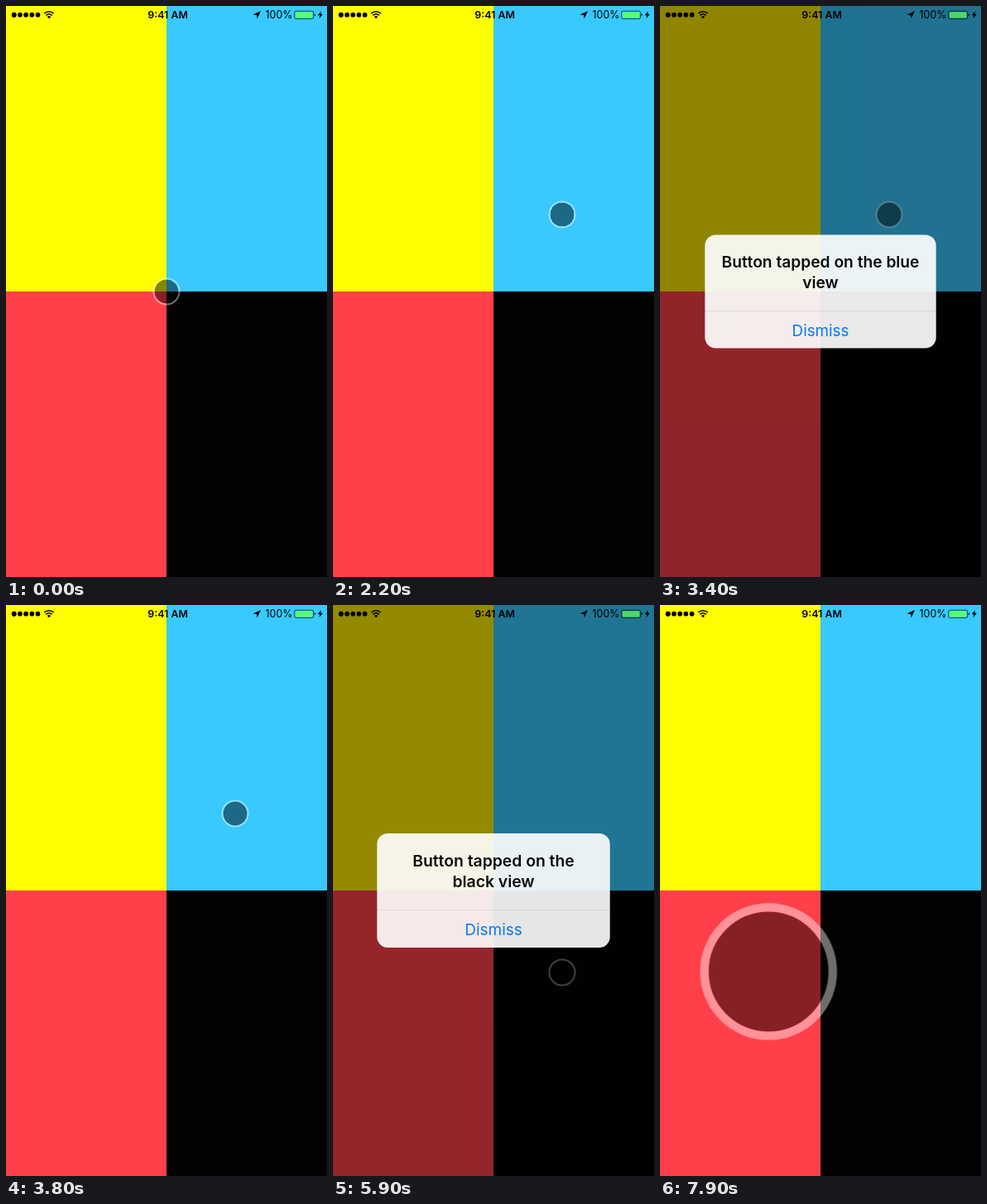
Write an HTML page that moves like this. It is 388 px wide and 690 px high and loops after 8 s.

```html
<!DOCTYPE html>
<html lang="en">
<head>
<meta charset="utf-8">
<title>Draggable button</title>
<style>
  html, body { margin: 0; width: 100%; height: 100%; overflow: hidden; background: #030102; }
  svg { display: block; width: 388px; height: 690px; font-family: Inter, Roboto, sans-serif; }
  text { text-anchor: middle; }

  .drag, .press, .dim, .pop, .fade, .first, .second {
    animation: 8s ease-in-out infinite;
  }
  .dim, .pop, .fade {
    animation-timing-function: linear(0, .317 12.5%, .666 25%, .856 37.5%, .942 50%, .978 62.5%, .992 75%, 1);
  }
  .drag { animation-name: drag; }
  .press { animation-name: press; }
  .dim { animation-name: dim; }
  .pop { animation-name: pop; }
  .fade { animation-name: fade; }
  .first { animation-name: first; animation-timing-function: step-end; }
  .second { animation-name: second; animation-timing-function: step-end; }

  @keyframes drag {
    0%, 17.5% { transform: translate(194px, 345px); }
    23.75%, 53.75% { transform: translate(277px, 252px); }
    62.31%, 94% { transform: translate(277px, 444px); }
    99%, 100% { transform: translate(130.6px, 443px); }
  }
  @keyframes press {
    0%, 14.375% { transform: scale(1); }
    18.125%, 23.75% { transform: scale(5); }
    27.5%, 49.375% { transform: scale(1); }
    53.125%, 62.5% { transform: scale(5); }
    66.25%, 90.625% { transform: scale(1); }
    94.375%, 100% { transform: scale(5); }
  }
  @keyframes dim {
    0%, 34.85% { opacity: 0; }
    39.85%, 42.5% { opacity: 1; }
    47.5%, 71.06% { opacity: 0; }
    76.06%, 78.75% { opacity: 1; }
    83.75%, 100% { opacity: 0; }
  }
  @keyframes fade {
    0%, 34.85% { opacity: 0; }
    38.85%, 42.5% { opacity: 1; }
    47.5%, 71.06% { opacity: 0; }
    75.06%, 78.75% { opacity: 1; }
    83.75%, 100% { opacity: 0; }
  }
  @keyframes pop {
    0%, 34.85% { transform: scale(1.165); }
    39.85%, 50% { transform: scale(1); }
    50.01%, 71.06% { transform: scale(1.165); }
    76.06%, 100% { transform: scale(1); }
  }
  @keyframes first { 0% { opacity: 1; } 50%, 100% { opacity: 0; } }
  @keyframes second { 0% { opacity: 0; } 50%, 100% { opacity: 1; } }

  .title { font-size: 19.2px; font-weight: 600; fill: #0c0a0c; }
  .action { font-size: 18.8px; fill: #087cf8; }
  .status { font-size: 12.4px; }
</style>
</head>
<body>
<svg viewBox="0 0 388 690">
  <rect width="388" height="690" fill="#030102"/>
  <rect width="194" height="345" fill="#ff0"/>
  <rect x="194" width="194" height="345" fill="#38c9ff"/>
  <rect y="345" width="194" height="345" fill="#ff404a"/>

  <g class="drag">
    <g class="press">
      <circle r="14.5" fill="#000" fill-opacity=".48"/>
      <circle r="15.52" fill="none" stroke="#fff" stroke-opacity=".43" stroke-width="2.07"/>
    </g>
  </g>

  <g class="dim">
    <rect width="194" height="345" fill="#f00" fill-opacity=".08"/>
    <rect width="388" height="690" fill-opacity=".44"/>
  </g>

  <g transform="translate(194 345)">
    <g class="pop">
      <g class="fade">
        <rect x="-139.7" y="-68.6" width="279.4" height="137.2" rx="13" fill="#fff" fill-opacity=".92"/>
        <path d="M-139.7 23.5h279.4" stroke="#000" stroke-opacity=".08"/>
        <g class="title">
          <g class="first">
            <text y="-28.7">Button tapped on the blue</text>
            <text y="-3.8">view</text>
          </g>
          <g class="second">
            <text y="-28.7">Button tapped on the</text>
            <text y="-3.8">black view</text>
          </g>
        </g>
        <text class="action" y="53.6">Dismiss</text>
      </g>
    </g>
  </g>

  <g class="status">
    <path d="M9.7 10.7h30" stroke="#000" stroke-width="5.7" stroke-linecap="round" stroke-dasharray="0 7.2"/>
    <path d="M9.7 10.7h0" stroke="#000" stroke-width="5.7" stroke-linecap="round"/>
    <path d="M46.3 9a8.2 8.2 0 0 1 11.4 0M48.4 11.3a5.2 5.2 0 0 1 7.2 0" fill="none" stroke="#000" stroke-width="1.6"/>
    <path d="M52 15.2l-2.1-2.2a3 3 0 0 1 4.2 0z"/>
    <text x="195.6" y="15.1" font-weight="600">9:41 AM</text>
    <path d="M308 6l-4.4 9.4-.6-4.4-4.6-.5z"/>
    <text x="330" y="15.1">100%</text>
    <rect x="348.8" y="6.2" width="22.8" height="9.2" rx="1.6" fill="none" stroke="#000" stroke-opacity=".75" stroke-width=".9"/>
    <rect x="349.8" y="7.2" width="20.8" height="7.2" rx=".8" fill="#59fb73"/>
    <rect class="dim" x="349.8" y="7.2" width="20.8" height="7.2" rx=".8" fill-opacity=".14"/>
    <path d="M372.8 9a2 2 0 0 1 0 3.6z"/>
    <path d="M381 6l-4.2 5.3h2.7l-1 4 4.4-5.5h-2.7z"/>
  </g>
</svg>
</body>
</html>
```
